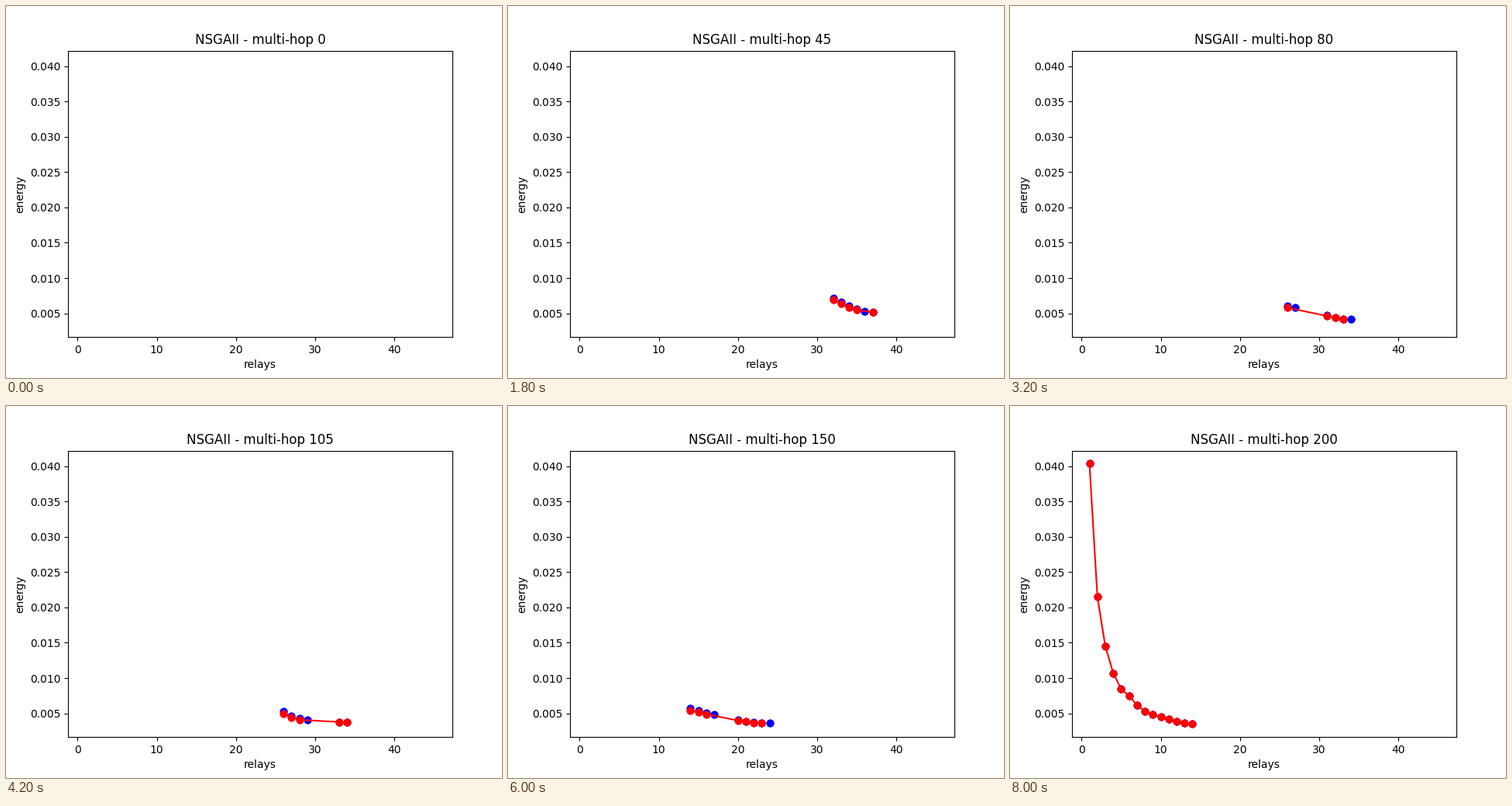
These frames come from a looping animation (640 by 480 pixels, 8200 ms). A matplotlib script:

```python
import numpy as np
import matplotlib.pyplot as plt
from matplotlib.animation import FuncAnimation

STEPS = 41
GENS_PER_STEP = 5
SETTLED = 35  # from this step on the front lies on the trade-off curve
COPIES = 3    # identical solutions drawn on top of each other

# Key poses of the front: its ends, its gap, its top energy and its bend
KEYS = [1, 9, 16, 26, 30, 35, 37]
POSE = dict(
    lo=[39, 32, 26, 25, 14, 3, 1],
    hi=[44, 36.6, 33, 34, 23, 14, 13.6],
    gap=[40, 36, 27, 31, 17, 9, 9],
    width=[1, 1, 4, 3, 3, 0, 0],
    top=[8.3, 6.9, 5.8, 5.05, 5.4, 14.5, 40.35],
    bend=[1.5, 1.6, 1, 8, 1.4, 4, 4],
)


def tradeoff(relays):
    """Final energy (in thousandths) for a number of relays."""
    knots = np.log([1, 2, 3, 5, 6, 8, 14])
    values = np.log([40.35, 21.5, 14.5, 8.45, 7.45, 5.27, 3.49])
    return np.exp(np.interp(np.log(relays), knots, values))


def points(step):
    """Population and front as (relays, energy) pairs."""
    lo, hi, gap, width, top, bend = (np.interp(step, KEYS, v) for v in POSE.values())
    floor = 3.6 + 2.5 * np.exp(-(step / 13) ** 2)
    slack = min(1, (STEPS - 1 - step) / 5)

    def left(r):
        return 1 - np.clip((r - lo) / (hi - lo), 0, 1)

    def energy(r):
        if step >= SETTLED:
            return tradeoff(r) + 0.2 * slack
        return floor + (top - floor) * left(r) ** bend

    front = np.arange(np.rint(lo), np.rint(hi) + 1)
    front = front[(front < gap) | (front >= gap + width)]
    # The rest of the population trails the front, one relay behind
    crowd = np.union1d(front, front + 1)
    crowd = crowd[crowd <= hi + 1]
    return ((crowd, energy(crowd) + 0.3 * slack * left(crowd)),
            (front, energy(front)))


fig, ax = plt.subplots(figsize=(6.4, 4.8), dpi=100)
ax.set_xlim(-1.203, 47.305)
ax.set_ylim(0.001644, 0.042195)
ax.set_xlabel("relays")
ax.set_ylabel("energy")
title = ax.set_title("")
population, = ax.plot([], [], "o", color="blue")
best, = ax.plot([], [], "o-", color="red")


def update(step):
    for line, (x, y) in zip((population, best), points(step)):
        copies = COPIES if step else 0
        line.set_data(np.repeat(x, copies), np.repeat(y / 1000, copies))
    title.set_text(f"NSGAII - multi-hop {step * GENS_PER_STEP}")
    return population, best, title


anim = FuncAnimation(fig, update, frames=STEPS, interval=200,
                     repeat=True, repeat_delay=0, blit=False)
plt.show()
```
